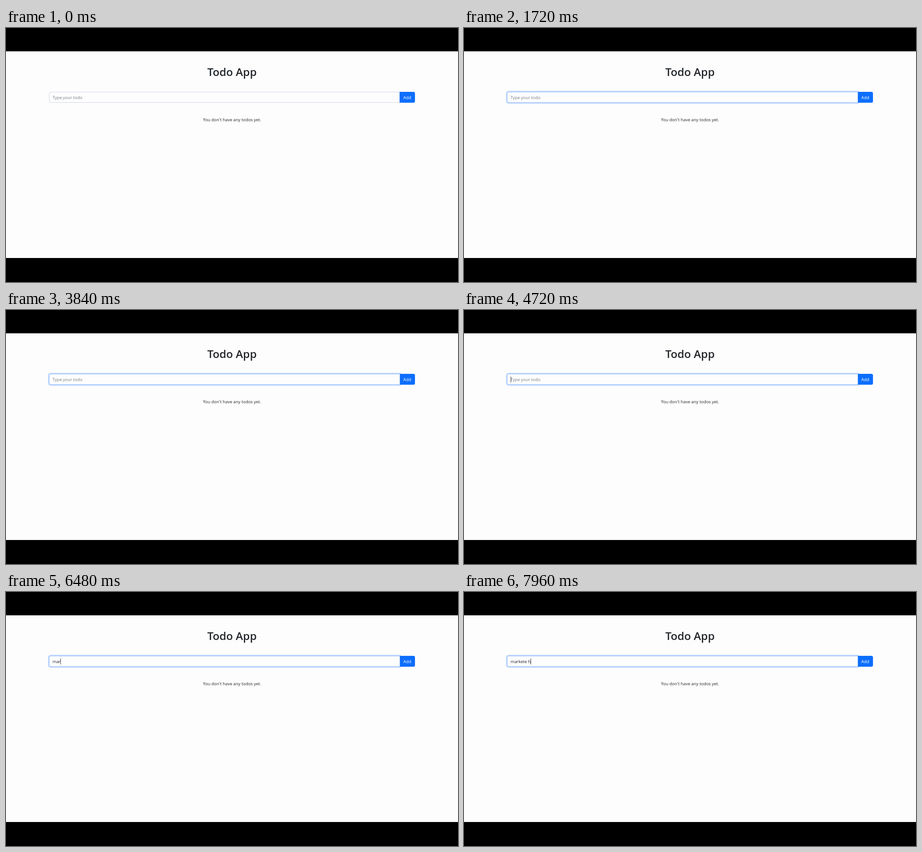
These frames come from a looping animation (998x561 px, 8 s). An HTML page:

```html
<!DOCTYPE html>
<html lang="en">
<head>
<meta charset="utf-8">
<title>Todo App</title>
<style>
  html, body { margin: 0; width: 100%; height: 100%; overflow: hidden; background: #000; }
  svg { display: block; width: 998px; height: 561px; }
  text { font: 9.4px "Open Sans", "Noto Sans", sans-serif; fill: #212529; white-space: pre; }
  .title { font-size: 24.2px; font-weight: 600; }
  .middle { text-anchor: middle; }
  #hint { fill: #757b81; }
  #add { fill: #fff; }
</style>
</head>
<body>
<svg viewBox="0 0 998 561">
  <rect width="998" height="561" fill="#000"/>
  <rect y="51.5" width="998" height="456.5" fill="#fdfdfd"/>
  <text class="title middle" x="499" y="106.2">Todo App</text>

  <path id="field" d="M869.5 141.5H98.5a3 3 0 0 0-3 3V161.500a3 3 0 0 0 3 3H869.500z" fill="#fdfdfd" stroke="#d0d5e6"/>
  <path d="M869 141H899.500a3.500 3.500 0 0 1 3.500 3.500V161.500a3.500 3.500 0 0 1-3.500 3.500H869z" fill="#0d6efd"/>
  <g id="focus" fill="none">
    <path d="M870.6 139.900H98.500a4.600 4.600 0 0 0-4.600 4.600V161.500a4.600 4.600 0 0 0 4.600 4.600H870.600z" stroke="#0d6efd" stroke-opacity=".25" stroke-width="2.4"/>
    <path d="M869.500 141.500H98.500a3 3 0 0 0-3 3V161.500a3 3 0 0 0 3 3H869.500z" stroke="#9cc3fd"/>
  </g>
  <text id="add" class="middle" x="886" y="156.700">Add</text>

  <text id="hint" x="102.700" y="156.700">Type your todo</text>
  <text id="typed" x="102.700" y="156.700"></text>
  <rect id="caret" y="147" width="1" height="13" fill="#33373b"/>
  <text class="middle" x="499" y="206.200">You don't have any todos yet.</text>
</svg>
<script>
  const LOOP = 8000, FOCUS_AT = 1100, FADE = 150, BLINK = 530, TEXT_X = 102.7;
  const message = "markete h";
  const keyTimes = [5960, 6160, 6360, 6640, 6840, 7060, 7300, 7600, 7840];
  const [focus, hint, typed, caret] =
    ["focus", "hint", "typed", "caret"].map(id => document.getElementById(id));

  function draw(time) {
    const count = keyTimes.filter(at => at <= time).length;
    const lastInput = count ? keyTimes[count - 1] : FOCUS_AT;
    const caretOn = time >= FOCUS_AT && (time - lastInput) % (2 * BLINK) < BLINK;

    focus.style.opacity = Math.min(1, Math.max(0, (time - FOCUS_AT) / FADE));
    hint.style.visibility = count ? "hidden" : "visible";
    typed.textContent = message.slice(0, count);
    const width = count ? typed.getComputedTextLength() : 0;
    caret.setAttribute("x", Math.floor(TEXT_X + width + 0.3));
    caret.style.visibility = caretOn ? "visible" : "hidden";
  }

  const start = performance.now();
  function tick() {
    draw((performance.now() - start) % LOOP);
    requestAnimationFrame(tick);
  }
  tick();
</script>
</body>
</html>
```
